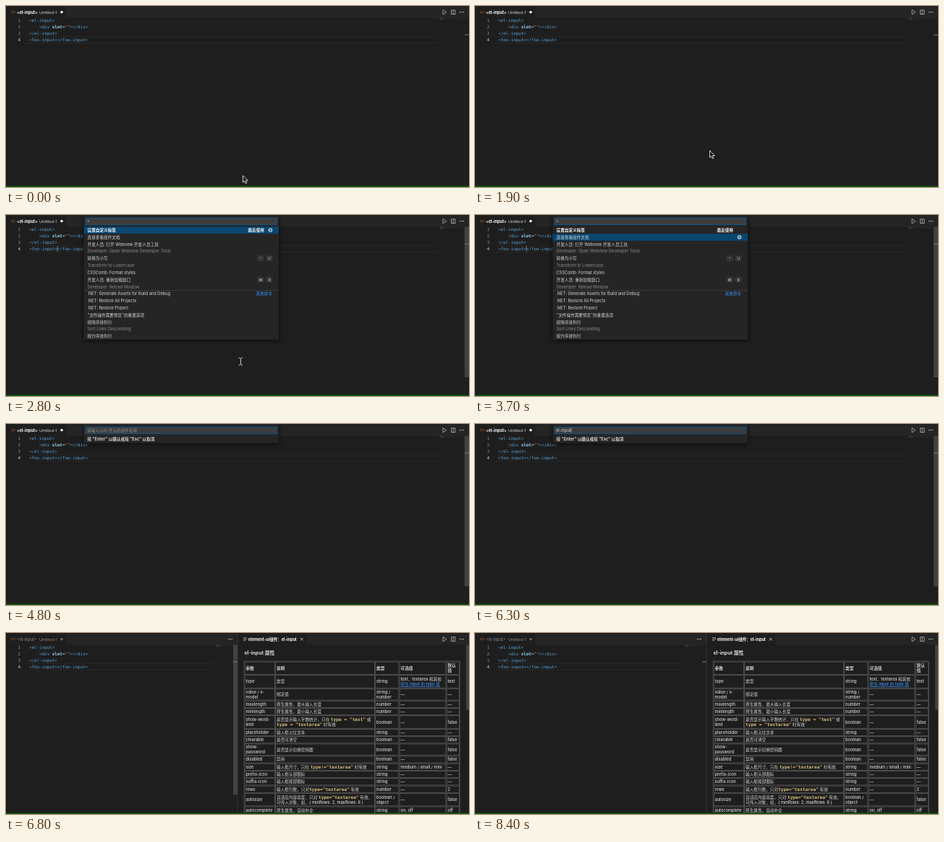
Recreate the animation shown at these times as an HTML page. Size 640x251 px, loop 8.5 s.

```html
<!DOCTYPE html>
<html lang="zh">
<head>
<meta charset="utf-8">
<title>Component docs in the editor</title>
<style>
html, body { margin: 0; width: 100%; height: 100%; overflow: hidden; background: #1e1e1e; }
svg { display: block; width: 100%; height: 100%; }
text { font: 5.65px Inter, "Noto Sans CJK SC", "Noto Sans CJK", sans-serif; white-space: pre; fill: #d8d8d8; }
#table text { font-weight: 500; }
.mono { font: 5.86px "DejaVu Sans Mono", monospace; }
.b, #table .b { font-weight: 700; }
.dim { fill: #8c8c8c; }
.white { fill: #fff; }
.link { fill: #3794ff; }
.under { text-decoration: underline; }
.code { font: bold 6.2px "DejaVu Sans Mono", monospace; fill: #d7ba7d; }
.punct { fill: #5a93b5; }
.tag { fill: #5aa9e0; }
.attr { fill: #9cdcfe; }
.str { fill: #ce9178; }
.shadow { filter: drop-shadow(0 1px 3px #000a); }
</style>
</head>
<body>
<svg id="stage" viewBox="0 0 640 251" preserveAspectRatio="none"></svg>
<script>
const LOOP = 8500;
const stage = document.getElementById('stage');

const esc = s => s.replace(/&/g, '&amp;').replace(/</g, '&lt;').replace(/>/g, '&gt;');
const rect = (x, y, w, h, fill, more = '') =>
  `<rect x="${x}" y="${y}" width="${w}" height="${h}" fill="${fill}" ${more}/>`;
const path = (d, stroke, width = 0.7, fill = 'none') =>
  `<path d="${d}" stroke="${stroke}" stroke-width="${width}" fill="${fill}"/>`;
const span = (cls, s) => `<tspan class="${cls}">${esc(s)}</tspan>`;
// y is the middle of the line
const rich = (x, y, body, cls = '', more = '') =>
  `<text x="${x}" y="${y + 2}" class="${cls}" ${more}>${body}</text>`;
const text = (x, y, s, cls, more) => rich(x, y, esc(s), cls, more);
const group = (id, body, cls = '') => `<g id="${id}" class="${cls}">${body}</g>`;
const ellipsis = x => [0, 2.3, 4.6].map(dx =>
  `<circle cx="${x + dx}" cy="8.5" r=".7" fill="#c5c5c5"/>`).join('');
const thumb = (id, x, w, h) => group(id, rect(x, 16.5, w, h, '#797979', 'opacity=".4"'));

const toolbar = () =>
  path('M604 5.4V11.8L608.8 8.6Z', '#c5c5c5') +
  path('M615.5 5.7H621V11.5H615.5ZM618.2 5.7V11.5', '#c5c5c5') + ellipsis(627.7);

function codeTab(id, titleCls, descCls, dot) {
  return group(id,
    rect(0, 1, 83, 15.5, '#1e1e1e') +
    path('M9 6.8L7.4 8.5L9 10.2M10.4 6.8L12 8.5L10.4 10.2', '#e37933') +
    text(15, 8.5, '<el-input>', titleCls, 'style="font-size:5.5px"') +
    text(46, 8.5, 'Untitled-1', descCls, 'style="font-size:5.4px"') +
    `<circle cx="77" cy="8.5" r="1.8" fill="${dot}"/>`);
}

function source() {
  const open = (name, s = '<') => span('punct', s) + span('tag', name);
  const lines = [
    open('el-input') + span('punct', '>'),
    '    ' + open('div') + ' ' + span('attr b', 'slot') + span('attr', '=') + span('str', '""') +
      span('punct', '>') + open('div', '</') + span('punct', '>'),
    open('el-input', '</') + span('punct', '>'),
    open('foo-input') + span('punct', '>') + open('foo-input', '</') + span('punct', '>')
  ];
  return lines.map((line, i) => {
    const y = 20.3 + i * 8.9;
    return text(20, y, String(i + 1), 'mono ' + (i < 3 ? 'dim' : ''), 'text-anchor="end"') +
      rich(32, y, line, 'mono');
  }).join('') + path('M46.3 25V33.5', '#3a3a3a', 0.5);
}

// Current line, minimap and ruler mark of an editor ending at x = right
function margins(id, right, mapWidth) {
  const map = right - mapWidth;
  return group(id,
    path(`M28 42.5H${map - 2}M28 51.5H${map - 2}`, '#2c2c2c') +
    path(`M${map} 16.6h3.5M${map + 1.5} 17.7h5.5M${map} 18.8h3.5`, '#35597a', 0.6) +
    path(`M${map + 6} 17.7H${right - 6}`, '#26323c', 0.6) +
    path(`M${right - 5.7} 16.5V249`, '#282828', 0.6) +
    path(`M${right - 6} 40H${right}`, '#8a8a8a', 0.9));
}

const inputBox = rect(110, 4.3, 264.5, 9, '#3c3c3c', 'stroke="#0b629c" stroke-width=".8"');

const key = (x, y, s) =>
  rect(x - 4, y - 3.6, 8, 7, '#333337', 'rx="1" stroke="#48484c" stroke-width=".5"') +
  text(x, y, s, '', 'text-anchor="middle" style="font-size:5px"');

function palette() {
  const rows = ['设置自定义标签', '直接查看组件文档',
    '开发人员: 打开 Webview 开发人员工具', '-Developer: Open Webview Developer Tools',
    '转换为小写', '-Transform to Lowercase', 'CSSComb: Format styles',
    '开发人员: 重新加载窗口', '-Developer: Reload Window',
    '.NET: Generate Assets for Build and Debug', '.NET: Restore All Projects',
    '.NET: Restore Project', '"文件操作需要预览"的重置选项',
    '按降序排列行', '-Sort Lines Descending', '按升序排列行'];
  const y = i => 21 + i * 9.82;
  const list = rows.map((s, i) => s[0] === '-'
    ? text(112.5, y(i), s.slice(1), 'dim')
    : text(112.5, y(i), s, i ? '' : 'b white')).join('');
  const gear = '<g fill="none" stroke="#fff"><circle cx="365.5" cy="21" r="2.3" stroke-width="1"/>' +
    '<circle cx="365.5" cy="21" r=".6" stroke-width=".5"/></g>';
  return group('palette',
    rect(107.5, 0, 269.5, 173, '#252526') + inputBox + text(112, 8.7, '>') +
    group('pick', rect(107.5, 16.2, 269.5, 9.6, '#094771') + gear) + list +
    text(357, 21, '最近使用', 'b white', 'text-anchor="end"') +
    text(368, y(9), '其他命令', 'link', 'text-anchor="end"') +
    path('M108 104.6H377', '#47474a', 0.6) +
    key(352, y(4), '^') + key(364, y(4), 'U') + key(352, y(7), '⌘') + key(364, y(7), 'R'),
    'shadow');
}

function prompt() {
  return group('prompt',
    rect(107.5, 0, 269.5, 26.5, '#252526') + inputBox +
    text(112, 8.7, '', '', 'id="typed"') +
    text(112.5, 20.6, '按 "Enter" 以确认或按 "Esc" 以取消', 'b'), 'shadow');
}

// Cells hold lines separated by |, `code` and [links].
function cellText(x, mid, s, cls = '') {
  const lines = s.split('|');
  return lines.map((line, i) => {
    const body = line.split(/(`[^`]+`|\[[^\]]+\])/).map(p =>
      p[0] === '`' ? span('code', p.slice(1, -1)) :
      p[0] === '[' ? span('link under', p.slice(1, -1)) : esc(p)).join('');
    return rich(x, mid + (i - (lines.length - 1) / 2) * 7.2, body, cls);
  }).join('');
}

function table() {
  const edges = [329.5, 372, 510, 543.5, 608.5, 627];
  const one = 10.3, two = 16.9, tall = 18.6;
  const rows = [
    [tall, '参数', '说明', '类型', '可选值', '默认|值'],
    [tall, 'type', '类型', 'string', 'text、textarea 和其他|[原生 input 的 type 值]', 'text'],
    [two, 'value / v-|model', '绑定值', 'string /|number', '—', '—'],
    [one, 'maxlength', '原生属性，最大输入长度', 'number', '—', '—'],
    [one, 'minlength', '原生属性，最小输入长度', 'number', '—', '—'],
    [tall, 'show-word-|limit', '是否显示输入字数统计，只在 `type = "text"` 或|`type = "textarea"` 时有效', 'boolean', '—', 'false'],
    [one, 'placeholder', '输入框占位文本', 'string', '—', '—'],
    [one, 'clearable', '是否可清空', 'boolean', '—', 'false'],
    [two, 'show-|password', '是否显示切换密码图', 'boolean', '—', 'false'],
    [one, 'disabled', '禁用', 'boolean', '—', 'false'],
    [one, 'size', '输入框尺寸，只在 `type!="textarea"` 时有效', 'string', 'medium / small / mini', '—'],
    [one, 'prefix-icon', '输入框头部图标', 'string', '—', '—'],
    [one, 'suffix-icon', '输入框尾部图标', 'string', '—', '—'],
    [one, 'rows', '输入框行数，只对`type="textarea"` 有效', 'number', '—', '2'],
    [tall, 'autosize', '自适应内容高度，只对 `type="textarea"` 有效，|可传入对象，如，{ minRows: 2, maxRows: 6 }', 'boolean /|object', '—', 'false'],
    [one, 'autocomplete', '原生属性，自动补全', 'string', 'on, off', 'off']
  ];
  let y = 39.5;
  const body = rows.map(([h, ...cells], r) => {
    const line = cells.map((s, c) =>
      rect(edges[c] + 0.6, y + 0.6, edges[c + 1] - edges[c] - 1.2, h - 1.2, 'none', 'stroke="#6a6a6a" stroke-width=".6"') +
      cellText(edges[c] + 2, y + h / 2, s, r ? '' : 'b')).join('');
    y += h;
    return line;
  }).join('');
  const frame = rect(329, 39, 298.5, 215, 'none', 'stroke="#5a5a5a" stroke-width=".6"');
  return group('table', text(329.5, 27.5, 'el-input 属性', 'b', 'style="font-size:6.9px"') +
    frame + body + thumb('docThumb', 636, 4, 90));
}

function docs() {
  return group('docs',
    rect(320, 1, 320, 249, '#1e1e1e') + rect(415, 1, 225, 15.5, '#252526') +
    path('M320 1V249', '#444', 0.6) + ellipsis(307.7) +
    path('M328 6.6H333M328 8.5H333M328 10.4H331.5', '#c5c5c5') +
    text(335, 8.5, 'element-ui组件：el-input', 'b white', 'style="font-size:5.5px"') +
    path('M406.9 6.7L410.7 10.5M410.7 6.7L406.9 10.5', '#e0e0e0', 0.8) +
    table());
}

stage.innerHTML =
  rect(0, 0, 640, 251, '#1e1e1e') + rect(83, 1, 557, 15.5, '#252526') +
  codeTab('tabOn', 'b white', '', '#fff') + codeTab('tabOff', 'dim', 'dim', '#6a6a6a') +
  margins('wide', 640, 40.5) + margins('narrow', 320, 30) + source() +
  group('caret', path('M71 43V51', '#aeafad')) +
  thumb('slider', 634, 6, 208.5) + thumb('leftSlider', 314, 6, 207.5) +
  palette() + prompt() + group('inputCaret', path('M0 5.5V12', '#d4d4d4', 0.6)) +
  docs() + toolbar() +
  path('M0 250.2H640', '#0a5a0a', 1.4) +
  group('arrow', path('M0 0V9.6L2.2 7.6L3.7 11L5.3 10.3L3.8 7H6.8Z', '#fff', 0.8, '#111')) +
  group('beam', path('M321.8 198Q324 198 324.4 199.6Q324.8 198 327 198M324.4 199.6V206.6M321.8 208.2Q324 208.2 324.4 206.6Q324.8 208.2 327 208.2', '#e8e8e8', 0.9));

const $ = id => document.getElementById(id);
const show = (id, on) => $(id).setAttribute('visibility', on ? 'inherit' : 'hidden');
const ramp = (t, a, b) => Math.min(1, Math.max(0, (t - a) / (b - a)));
const ease = k => k * k * (3 - 2 * k);

const WORD = 'el-input';
const KEYS = [5000, 5200, 5400, 5500, 5600, 5800, 6000, 6100];
const OPEN = 2500, PICK = 3600, ASK = 3900, DONE = 6400, SPLIT = 6600, LOADED = 6800;

function draw(t) {
  const split = t >= SPLIT, asking = t >= ASK && t < DONE, listing = t >= OPEN && t < ASK;
  show('tabOn', !split);
  show('tabOff', split);
  show('wide', !split);
  show('narrow', split);
  show('caret', listing);
  show('slider', t >= 2000 && !split);
  show('leftSlider', split && t < 7100);
  show('palette', listing);
  $('pick').setAttribute('transform', `translate(0 ${t < PICK ? 0 : 9.82})`);
  show('prompt', asking);
  show('docs', split);
  show('table', t >= LOADED);

  const count = KEYS.filter(k => t >= k).length;
  const typed = $('typed');
  typed.textContent = count ? WORD.slice(0, count) : '请输入以el-开头的组件名称';
  typed.setAttribute('class', count ? '' : 'dim');
  const end = count ? typed.getComputedTextLength() : 0;
  show('inputCaret', asking && (count > 0 || t < 4400));
  $('inputCaret').setAttribute('transform', `translate(${112.3 + end} 0)`);

  const up = ease(ramp(t, 50, 200)), drift = ease(ramp(t, 1300, 1850));
  $('arrow').setAttribute('transform', `translate(${327.5 - 3 * drift} ${235 - 21 * up - 13.5 * drift})`);
  show('arrow', t < 2000);
  show('beam', t >= 2000 && t < PICK);
}

const start = performance.now();
function tick() {
  draw((performance.now() - start) % LOOP);
  requestAnimationFrame(tick);
}
tick();
</script>
</body>
</html>
```
